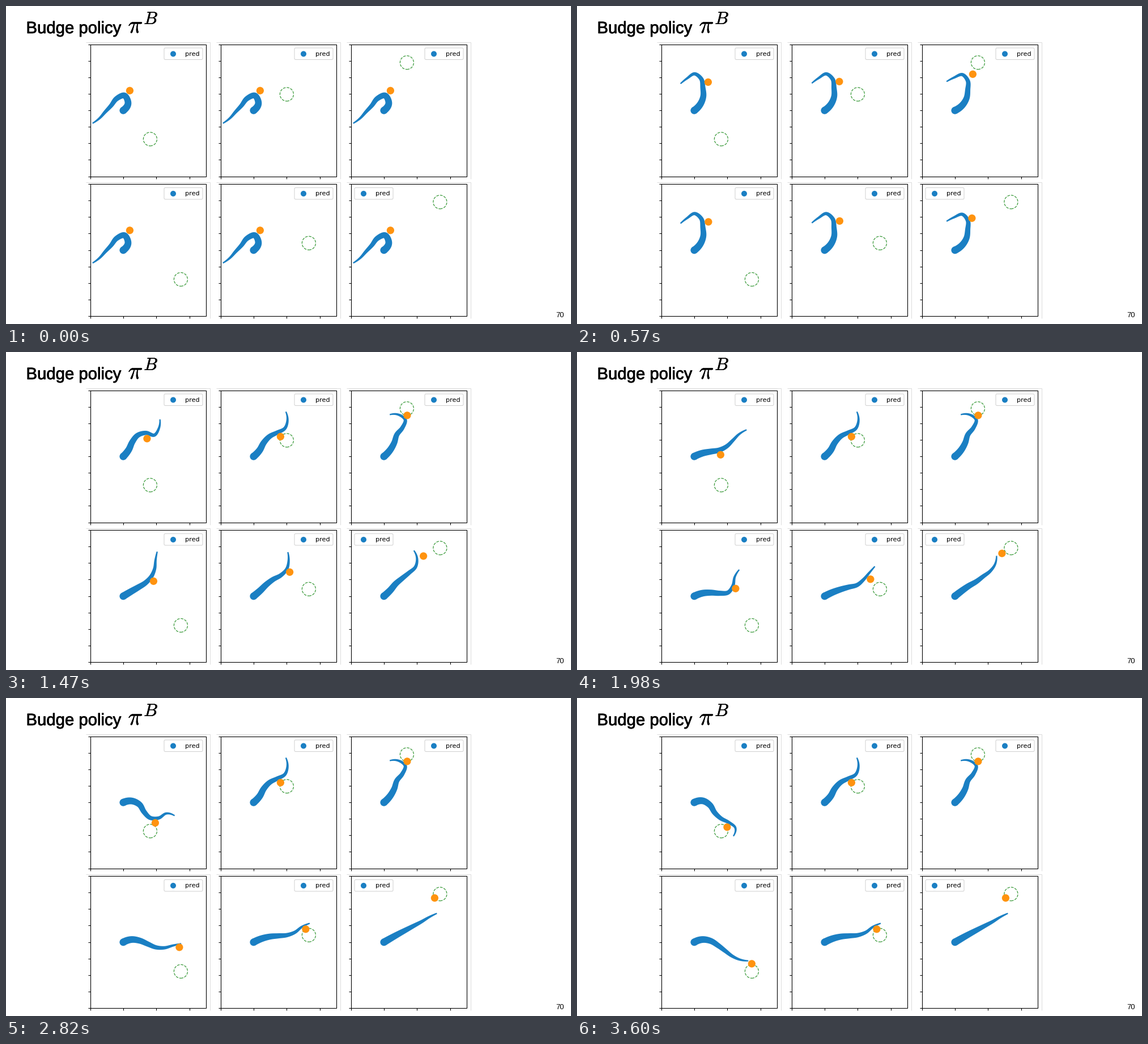
Write a matplotlib script that moves like this. It is 997 px wide and 561 px high and loops after 3.66 s.

```python
import numpy as np
import matplotlib.pyplot as plt
from matplotlib.animation import FuncAnimation
from matplotlib.collections import LineCollection
from matplotlib.patches import Circle, Ellipse, FancyBboxPatch, Polygon, Rectangle
from matplotlib.patheffects import withStroke

W, H, DPI = 997, 561, 64
FRAMES, STEP_MS = 122, 30
PX = 72 / DPI                      # points per pixel
BLUE, ORANGE, GREEN = "#1a7fc3", "#ff930f", "#3a9a3a"
PANEL_W, PANEL_H = 204, 233
TICK_X, TICK_Y = 58.4, PANEL_H / 8
LINK = 15.2                        # length of one arm link
BALL_START = (11.5, -35)

# The arm is a chain of seven equal links; a shape lists their headings in
# degrees (clockwise from the right), starting at the fixed end.
COIL = (-56, -115, -202, -232, -227, -228, -216)
HOOK = (-46, -69, -93, -100, -142, -211, -219)
SWING = (-57, -76, -73, -47, -24, -96, -140)
OVER = (-50, -63, -60, -46, -53, -114, -145)
CROOK = (-46, -60, -72, -51, -70, -143, -180)


def turned(shape, degrees):
    return tuple(a + degrees for a in shape)


def cubic(t, y, m, x):
    """Cubic pieces through y(t) with slopes m, sampled at the array x."""
    k = np.clip(np.searchsorted(t, x, "right") - 1, 0, len(t) - 2)
    h = (t[k + 1] - t[k])[:, None]
    u = (x - t[k])[:, None] / h
    return ((1 + 2 * u) * (1 - u) ** 2 * y[k] + u * (1 - u) ** 2 * h * m[k]
            + u * u * (3 - 2 * u) * y[k + 1] + u * u * (u - 1) * h * m[k + 1])


def monotone_slopes(t, y):
    d = np.diff(y, axis=0) / np.diff(t)[:, None]
    a, b = d[:-1], d[1:]
    same = a * b > 0
    inner = np.where(same, 2 * a * b / np.where(same, a + b, 1), 0)
    return np.vstack([d[:1], inner, d[-1:]])


def arm_outline(headings):
    """Smooth tapered outline around the chain of links."""
    a = np.radians(headings)
    links = LINK * np.column_stack([np.cos(a), np.sin(a)])
    joints = np.vstack([[0, 0], np.cumsum(links, axis=0)])
    index = np.arange(len(joints), dtype=float)
    slopes = np.gradient(joints, axis=0, edge_order=2)
    along = np.linspace(0, index[-1], 71)
    line = cubic(index, joints, slopes, along)
    tangent = np.gradient(line, axis=0)
    tangent /= np.hypot(*tangent.T)[:, None]
    normal = tangent[:, ::-1] * (-1, 1)
    half = (6.4 - 5.3 * (along / index[-1]) ** 1.25)[:, None]
    return np.vstack([line + normal * half, (line - normal * half)[::-1]])


fig = plt.figure(figsize=(W / DPI, H / DPI), dpi=DPI, facecolor="white")
ax = fig.add_axes([0, 0, 1, 1])
ax.set_xlim(0, W)
ax.set_ylim(H, 0)
ax.axis("off")


def label(x, y, text, size, font="Liberation Sans", stroke=0, **kw):
    if stroke:
        kw["path_effects"] = [withStroke(linewidth=stroke * PX,
                                         foreground="black")]
    ax.text(x, y, text, fontsize=size * PX, family=font, va="baseline", **kw)


def draw_frame(x, y):
    ax.add_collection(LineCollection(
        [[(x - 7.5, y - 3.5), (x + 211.5, y - 3.5), (x + 211.5, y + 237)]],
        colors="#dcdcdc", linewidths=PX))
    ax.add_patch(Rectangle((x, y), PANEL_W, PANEL_H, fill=False,
                           ec="black", lw=1.1 * PX))
    bottom = y + PANEL_H
    ticks = [[(x - 4, y + i * TICK_Y), (x, y + i * TICK_Y)]
             for i in range(9)]
    ticks += [[(x + i * TICK_X, bottom), (x + i * TICK_X, bottom + 4)]
              for i in range(4)]
    ax.add_collection(LineCollection(ticks, colors="black",
                                     linewidths=1.1 * PX))


def draw_legend(x, y):
    ax.add_patch(FancyBboxPatch(
        (x, y), 68, 20.5, boxstyle="round,pad=0,rounding_size=2.2",
        fc="white", ec="#d0d0d0", lw=PX))
    ax.add_patch(Circle((x + 16, y + 10.5), 5, fc=BLUE, lw=0))
    label(x + 37, y + 13.8, "pred", 11.3, "DejaVu Sans")


class Panel:
    """One plot; each key is (ms, ball position, arm shape)."""

    def __init__(self, col, row, goal, keys, legend_x=130.5):
        x, y = 148.5 + 230 * col, 67.5 + 246.5 * row
        self.base = np.array([x + TICK_X, y + PANEL_H / 2 + 0.3])
        keys = [(0, BALL_START, COIL)] + keys
        self.times = np.array([ms for ms, _, _ in keys], float)
        self.states = np.array([ball + shape for _, ball, shape in keys],
                               float)
        self.slopes = monotone_slopes(self.times, self.states)

        draw_frame(x, y)
        draw_legend(x + legend_x, y + 6.5)
        ax.add_patch(Ellipse(self.base + goal, 24, -24, fill=False, ec=GREEN,
                             lw=1.25 * PX, ls="--"))
        ax.add_patch(Circle(self.base, 6.5, fc=BLUE, lw=0))
        self.arm = ax.add_patch(Polygon([(0, 0)] * 3, fc=BLUE, lw=0, zorder=3))
        self.ball = ax.add_patch(Circle((0, 0), 6.6, fc=ORANGE, lw=0,
                                        zorder=4))

    def show(self, ms):
        t = np.array([min(ms, self.times[-1])])
        state = cubic(self.times, self.states, self.slopes, t)[0]
        self.ball.center = self.base + state[:2]
        self.arm.set_xy(self.base + arm_outline(state[2:]))


label(35.5, 48, "Budge policy", 29.3, stroke=0.8)
label(215.5, 47.5, r"$\pi$", 43, stroke=0.5, math_fontfamily="cm")
label(243.3, 32, "$B$", 31, stroke=0.4, math_fontfamily="cm")
label(970.5, 549.3, "70", 13)

panels = [
    Panel(0, 0, (47.5, 50.5), [
        (570, (24.5, -50), HOOK),
        (1020, (35.5, -48), SWING),
        (1470, (42, -31.5), (-51, -65, -51, -16, 15, -57, -84)),
        (1980, (46.5, -3), (-22, -11, -10, -27, -44, -45, -30)),
        (2820, (56.5, 36), (-10, 25, 58, 44, 0, -31, 15)),
        (3600, (58, 43.5), (-11, 31, 58, 43, 27, 39, 103))]),
    Panel(1, 0, (58.5, -28.5), [
        (570, (26, -51), turned(HOOK, 2)),
        (1020, (41, -46.5), turned(SWING, 2)),
        (1380, (47.5, -35), (-46, -61, -47, -27, -29, -72, -101))]),
    Panel(2, 0, (40.5, -84.5), [
        (570, (31.5, -64), turned(HOOK, 11)),
        (900, (41, -72.5), CROOK)]),
    Panel(0, 1, (101.5, 51.5), [
        (570, (25, -50), HOOK),
        (1020, (37.5, -46), SWING),
        (1470, (53.5, -26.5), (-31, -30, -32, -47, -67, -84, -79)),
        (1980, (73, -13.5), (-20, -4, 4, -5, -55, -79, -58)),
        (2820, (99, 9), (-18, 8, 23, 22, 3, -15, -13)),
        (3600, (101.5, 38), (-18, 10, 32, 37, 37, 25, 8))]),
    Panel(1, 1, (97.5, -12.5), [
        (570, (26.5, -51.5), turned(HOOK, 2)),
        (1020, (47, -50), OVER),
        (1980, (81, -30), (-26, -20, -16, -14, -40, -50, -49)),
        (2330, (92, -23), (-24, -14, -5, -5, -20, -38, -24))]),
    Panel(2, 1, (99, -85), [
        (570, (30, -56.5), turned(HOOK, 11)),
        (1020, (54.5, -65.5), turned(OVER, 5)),
        (1980, (83, -75.5), (-38, -35, -30, -37, -37, -54, -80)),
        (2330, (89.5, -78), (-30, -29, -28, -28, -28, -31, -26))],
        legend_x=6.5),
]


def update(frame):
    for panel in panels:
        panel.show(frame * STEP_MS)
    return []


anim = FuncAnimation(fig, update, frames=FRAMES, interval=STEP_MS,
                     init_func=lambda: update(0), repeat=True, repeat_delay=0)
plt.show()
```
